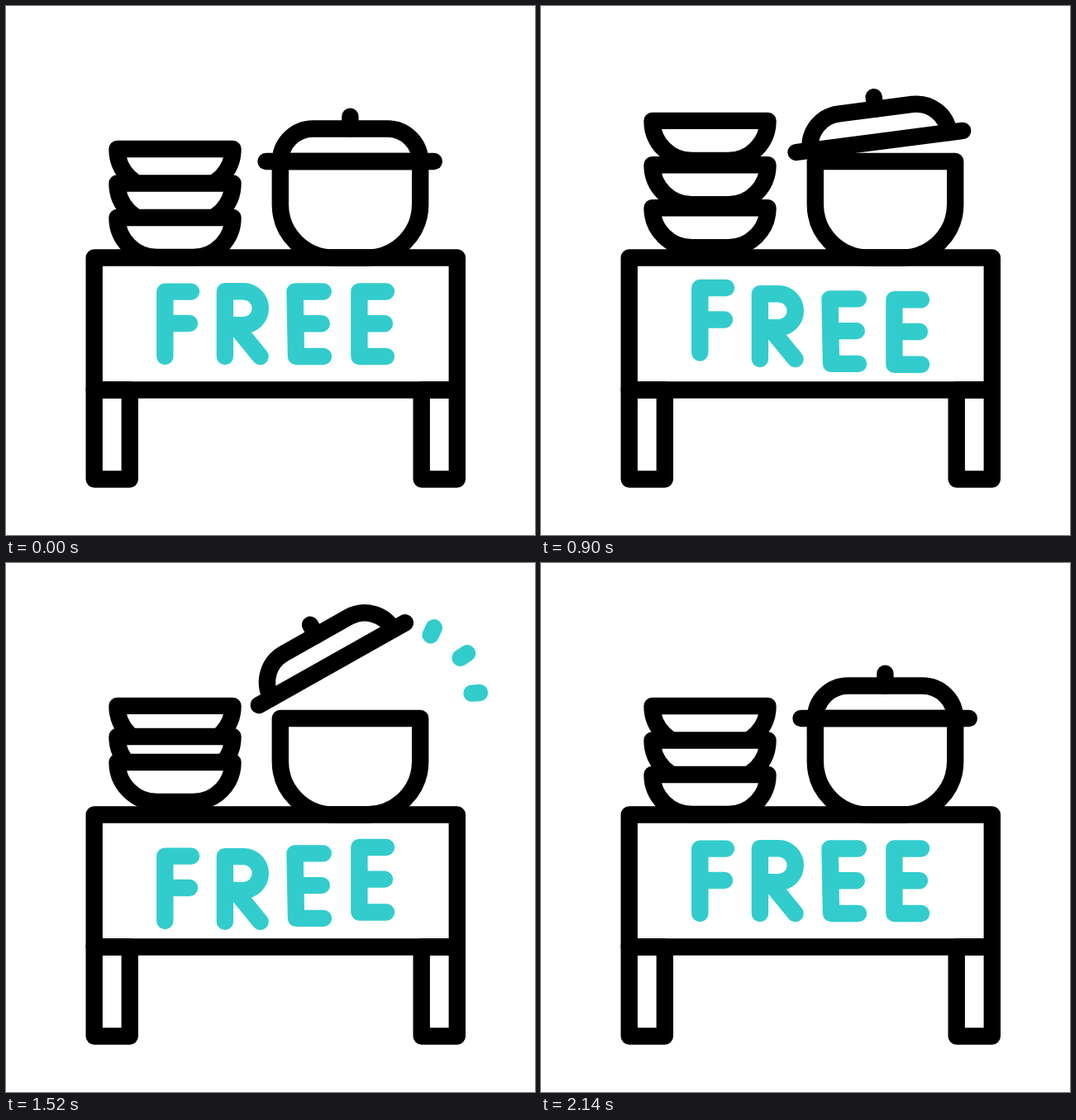
Recreate the animation shown at these times as an HTML page. Size 640 by 640 pixels, loop 2400 ms.

```html
<!DOCTYPE html>
<html lang="en">
<head>
<meta charset="utf-8">
<title>Free food stall</title>
<style>
  html, body { margin: 0; width: 100%; height: 100%; overflow: hidden; background: #fff; }
  svg { display: block; width: 100%; height: 100%; }
  .ink, .teal { fill: none; stroke-width: 20.4; stroke-linecap: round; stroke-linejoin: round; }
  .ink { stroke: #000; }
  .teal { stroke: #33cccc; }
  .bowl { fill: #fff; }
</style>
</head>
<body>
<svg viewBox="0 0 640 640" role="img" aria-label="FREE">
  <g class="ink">
    <g id="bowls"></g>
    <path d="M331.8 188H501.2V240a64.5 64.5 0 0 1-64.5 64.5H396.3a64.5 64.5 0 0 1-64.5-64.5Z"/>
    <g id="lid">
      <path d="M314.5 188H517.8"/>
      <path d="M332 188a39.5 39.5 0 0 1 39.5-39.5H461.5a39.5 39.5 0 0 1 39.5 39.5"/>
      <path d="M416.4 133.8V148.5"/>
    </g>
    <path d="M106.7 304.5H545.8V464.5H106.7Z"/>
    <path d="M106.7 464.5H149.8V572.5H106.7Z"/>
    <path d="M502.7 464.5H545.8V572.5H502.7Z"/>
  </g>
  <g class="teal" id="word">
    <path d="M192.3 424V345.6H224M192.3 384H222"/>
    <path d="M264.9 424V345.2H287.3a20.5 20.5 0 0 1 0 41H264.9M276.5 386L307.6 424"/>
    <path d="M383.8 345.5H349.5L351 424H384M351 384.2H381.8"/>
    <path d="M460 345.5H427.4V424H460M427.4 384.2H458"/>
  </g>
  <g class="teal" id="rays"></g>
</svg>
<script>
const LOOP = 2400, STEP = 20;
const SVG = "http://www.w3.org/2000/svg";
const $ = id => document.getElementById(id);

const clamp = x => Math.min(1, Math.max(0, x));
const ease = (t, from, to) => (1 - Math.cos(Math.PI * clamp((t - from) / (to - from)))) / 2;

function addPath(parent, d, cls = "") {
  const path = document.createElementNS(SVG, "path");
  path.setAttribute("d", d);
  path.setAttribute("class", cls);
  return parent.appendChild(path);
}
const move = (el, x, y) => el.setAttribute("transform", `translate(${x.toFixed(2)} ${y.toFixed(2)})`);

// Stacked bowls: rim height, lift and the time of the highest point
const bowls = [
  { rim: 173, lift: 39, peak: 1020 },
  { rim: 214.5, lift: 36, peak: 1120 },
  { rim: 256, lift: 38, peak: 1225 }
].map(b => ({
  ...b,
  el: addPath($("bowls"),
    `M134.5 ${b.rim}a48 48 0 0 0 48 48H226.5a48 48 0 0 0 48-48Z`, "bowl")
}));
const HOP = 520;

function drawBowls(t) {
  for (const { el, lift, peak } of bowls) {
    const up = ease(t, peak - HOP, peak) - ease(t, peak, peak + HOP);
    move(el, 0, -lift * up);
  }
}

// Lid: swings open around its left end while that end drifts
const OPEN = 570, WIDE = 1560, SHUT = 1910, TILT = 29.5;

function drawLid(t) {
  const rising = t < WIDE;
  const p = rising ? ease(t, OPEN, WIDE) : 1 - ease(t, WIDE, SHUT);
  const drift = rising ? p * (3.05 - 2.14 * p) : 0.91 * p;
  $("lid").setAttribute("transform",
    `translate(${-9.5 * drift} ${-17.5 * drift}) rotate(${-TILT * p} 314.5 188)`);
}

// Letters: down, up, down and back, one after another
const letters = [...$("word").children];
const WAVE_START = 240, WAVE_LAG = 100, BEAT = 400, SWING = 10;
const poses = [0, 1, -1, 1, 0];

function wave(t) {
  let y = 0;
  for (let i = 1; i < poses.length; i++)
    y += (poses[i] - poses[i - 1]) * ease(t, (i - 1) * BEAT, i * BEAT);
  return SWING * y;
}
function drawLetters(t) {
  letters.forEach((el, i) => move(el, 0, wave(t - WAVE_START - i * WAVE_LAG)));
}

// Rays: each line grows from its inner end, then its tail catches up
const rays = [
  [513.7, 87.2, 517.8, 78.2],
  [549.6, 114.8, 558, 109.2],
  [563.5, 157.6, 573, 157]
].map(ends => ({ ends, el: addPath($("rays"), "") }));

function drawRays(t) {
  const head = ease(t, 1300, 1510), tail = ease(t, 1530, 1730);
  $("rays").style.display = head > tail ? "" : "none";
  for (const { el, ends: [x1, y1, x2, y2] } of rays) {
    const at = k => `${x1 + (x2 - x1) * k} ${y1 + (y2 - y1) * k}`;
    el.setAttribute("d", `M${at(tail)}L${at(head)}`);
  }
}

function draw(now) {
  const t = Math.floor((now % LOOP) / STEP) * STEP;
  drawBowls(t);
  drawLid(t);
  drawLetters(t);
  drawRays(t);
}

function tick() {
  draw(performance.now());
  requestAnimationFrame(tick);
}
draw(0);
requestAnimationFrame(tick);
</script>
</body>
</html>
```
